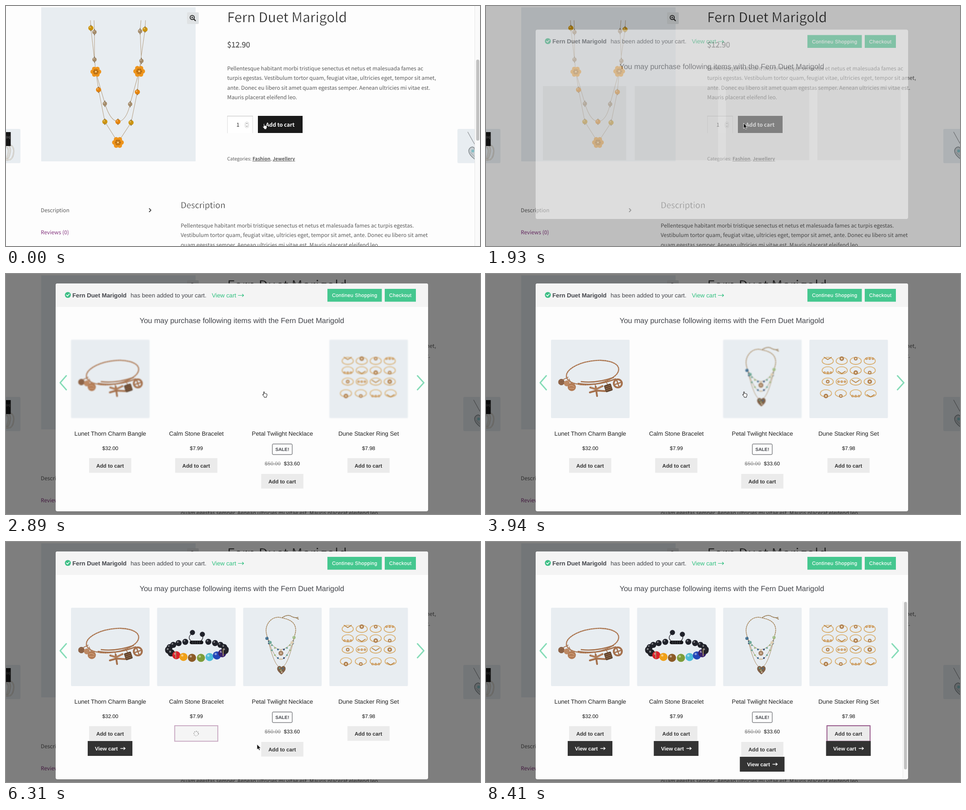
An HTML page for the animation above (9.01 s loop, 1050 px wide and 533 px high).

```html
<!DOCTYPE html>
<html lang="en">
<head>
<meta charset="utf-8">
<title>Shop popup</title>
<style>
html, body { margin: 0; height: 100%; overflow: hidden; background: #fdfdfd; }
svg { display: block; width: 100vw; height: 100vh; }
text { text-rendering: geometricPrecision; white-space: pre; }
.page { font: 11.86px "Noto Sans CJK SC", "Noto Sans CJK JP", "Noto Sans CJK", sans-serif; fill: #5a5a5a; }
.thin { fill: #2b2b2b; stroke: #fdfdfd; stroke-width: .5px; }
.pop { font: 13.2px "Liberation Sans", Arial, sans-serif; fill: #43454b; }
.mid { text-anchor: middle; }
.bold { font-weight: 700; }
.small { font-size: 11.6px; }
.line { fill: none; stroke-linecap: round; stroke-linejoin: round; }
</style>
</head>
<body>
<svg id="stage" viewBox="0 0 1050 533"></svg>
<script>
const LOOP = 9010, NAME = 'Fern Duet Marigold';
const $ = id => document.getElementById(id);
const map = (list, f) => list.map(f).join('');
const range = n => [...Array(n).keys()];
const text = (x, y, s, attrs = '') => `<text x="${x}" y="${y}" ${attrs}>${s}</text>`;
const rect = (x, y, w, h, fill, attrs = '') => `<rect x="${x}" y="${y}" width="${w}" height="${h}" fill="${fill}" ${attrs}/>`;
const dot = (x, y, r, fill, attrs = '') => `<circle cx="${x}" cy="${y}" r="${r}" fill="${fill}" ${attrs}/>`;
const line = (d, color, w = 1, attrs = '') => `<path class="line" d="${d}" stroke="${color}" stroke-width="${w}" ${attrs}/>`;
const oval = (x, y, rx, ry, color, w, attrs = '') => `<ellipse cx="${x}" cy="${y}" rx="${rx}" ry="${ry}" fill="none" stroke="${color}" stroke-width="${w}" ${attrs}/>`;
const bead = (x, y, r, color) => dot(x, y, r, color) + dot(x - r * .3, y - r * .35, r * .28, '#fff', 'opacity=".45"');
const spinner = (id, x, y, r, size) => `<g id="${id}" display="none"><g transform="translate(${x} ${y})"><g class="spin">` +
  map(range(8), i => dot(r * Math.cos(i * Math.PI / 4), r * Math.sin(i * Math.PI / 4), size, '#777', `opacity="${.4 + i * .08}"`)) + '</g></g></g>';

function flower(x, y, r) {
  const ring = (n, d, s, color) => map(range(n), i =>
    dot(x + d * Math.cos(i * 2 * Math.PI / n), y + d * Math.sin(i * 2 * Math.PI / n), s, color));
  return ring(6, r * .6, r * .4, '#ee951d') + dot(x, y, r * .55, '#d98212') + ring(6, r * .34, 1.2, '#8b5a20') + dot(x, y, 1.8, '#f4d8a0');
}

function mainNecklace() {
  const strands = 'M187 32L188 49L199 146L205 186L219 257L248 303L277 259L291 191L295 145L308 52L309 32' +
    'M195 32L196 58L196 119L199 146Q208 180 219 216Q230 254 248 257Q267 255 275 217L295 145L300 122L297 56L299 32';
  const beads = { '#cc940f': [[188, 49], [308, 52], [219, 257], [277, 259]],
    '#e5850f': [[205, 186], [291, 191], [248, 257]],
    '#a58c6b': [[196, 58], [297, 56], [196, 119], [300, 122], [219, 217], [275, 218]] };
  return line(strands, '#b8a48a', 1.1) +
    map(Object.entries(beads), ([c, list]) => map(list, ([x, y]) => bead(x, y, c == '#a58c6b' ? 4.8 : 5.7, c) + line(`M${x} ${y - 6.5}v2m0 9v2`, '#7d6a50', 1.6))) +
    flower(199, 146, 12) + flower(295, 145, 13) + flower(248, 303, 13);
}

function bangle() {
  const c = '#a5714d';
  const tilt = 'transform="rotate(-9 236 219)"';
  return oval(236, 219, 58.5, 26, c, 2.4, tilt) + oval(236, 219, 58.5, 26, '#d5a47d', 1, tilt + ' stroke-dasharray="2 3"') +
    line('M204 243Q245 250 287 233M211 239Q245 243 282 230', c, 2.6) +
    line('M182 229L170 235M184 233L190 246M242 244V250M266 240L270 246M288 234L292 240', c, 1.5) +
    dot(167, 240, 7, '#7d553b') + dot(179, 243, 6.5, '#bd8964') + dot(190, 251, 9, '#b37c56') +
    line('M160 240H174M162 236H172M162 244H172', '#d2a079', .8) + line('M184 249Q190 245 196 251M185 254H195', '#dfb38f', 1) +
    line('M243 250L246 271M231 252L244 256L258 249M230 263L244 259L264 260', c, 4) + line('M232 252L244 256L257 250', '#cc9a75', 1) +
    `<g transform="rotate(-18 271 253)">${rect(263, 245, 16, 16, '#5f442f', 'rx="2"')}${line('M265 249H277M265 253H277M265 257H277', '#a7754f', 1.2)}</g>` +
    oval(292, 243, 9, 9, c, 4) + line('M289 235L295 251M284 246L301 240', c, 2.5);
}

function stoneBracelet() {
  const back = map(range(12), i => {
    const a = Math.PI * (1.02 + i * .087);
    return i > 4 && i < 7 ? '' : bead(423 + 64 * Math.cos(a), 240 + 20 * Math.sin(a), 6.7, '#20222a');
  });
  const colors = ['#202127', '#202127', '#d8232d', '#f0a018', '#8b5a26', '#7d9d3a', '#4dbcd8', '#2447b8', '#39226f', '#24232b'];
  const front = map(colors, (c, i) => {
    const a = Math.PI * (.96 - i * .101);
    return bead(423 + 63 * Math.cos(a), 238 + 19.5 * Math.sin(a), i > 1 && i < 9 ? 9 : 8, c);
  });
  return line('M413 202Q399 213 412 221M435 206Q439 215 430 221', '#282a30', 1.4) + dot(413, 201, 5.7, '#20222a') + dot(435, 205, 5.7, '#20222a') +
    back + line('M411 223H433', '#17181c', 8) + line('M414 219V227M419 219V227M424 219V227M429 219V227', '#55565b', .8) +
    front + line('M376 244V258M481 238V253', '#a48d68', 2);
}

function tierNecklace() {
  const gold = '#a98a62', tints = ['#3f6c8e', '#6da796', '#d9c9ad', '#9fbb85', '#344d77'];
  const tier = (dip, n) => map(range(n), i => {
    const u = (i + .5) / n * 2 - 1;
    return dot(609 + 30 * u, 216 + dip * (1 - u * u), 2, tints[(i * 2 + n) % 5]);
  });
  return line('M581 216Q570 192 584 176Q596 163 613 169Q646 175 641 202L637 216', gold, 1.7, 'stroke-dasharray="2.5 2"') +
    line('M612 168Q623 160 632 165T648 167M642 168L649 172', '#9b805b', 1.8, 'stroke-dasharray="2.5 1.8"') +
    map([24, 46, 64], d => line(`M580 215Q609 ${215 + 2 * d} 638 215`, gold, 1)) +
    tier(24, 9) + tier(44, 9) + map([[578, 214], [585, 223], [634, 223], [638, 212]], ([x, y], i) => bead(x, y, 3.5, tints[i])) +
    dot(609, 247, 5.5, '#a38365') + dot(609, 247, 2, '#d8bca0') +
    `<path d="M610 294Q597 284 602 277Q607 273 610 278Q614 273 618 277Q623 284 610 294Z" fill="#806148"/>` +
    map([[606, 280, 1], [613, 281, 0], [609, 285, 3], [611, 289, 2]], ([x, y, i]) => dot(x, y, 1.7, tints[i]));
}

function ringSet() {
  const rows = [193, 214, 239, 265], gemShift = [-5, 5, 0, 6];
  return map(range(16), i => {
    const col = i % 4, row = i >> 2, x = 757 + col * (row == 3 ? 33 : 31) - (row == 3 ? 4 : 0), y = rows[row];
    const gem = (i * 7 + row) % 4, g = y + gemShift[row];
    const top = gem == 0 ? line(`M${x - 8} ${g - 3}L${x} ${g + 2}L${x + 8} ${g - 3}`, '#b7813f', 1.8)
      : gem == 1 ? map([-7, 0, 7], d => dot(x + d, g, 2.6, '#c18a4b') + dot(x + d, g, 1, '#f6e6cb'))
      : dot(x, g, gem + 2, '#af8050') + dot(x, g, 2, '#efdbc0');
    return oval(x, y, 12.5, 8, '#cfa160', 1.7) + oval(x, y - .7, 12.5, 7.5, '#efd29c', .7) + top;
  });
}

const items = [
  { x: 144, y: 409, name: 'Lunet Thorn Charm Bangle', price: '$32.00', load: 4840, done: 5720, art: bangle },
  { x: 334.7, y: 409, name: 'Calm Stone Bracelet', price: '$7.99', load: 5570, done: 6610, art: stoneBracelet },
  { x: 525.3, y: 444, name: 'Petal Twilight Necklace', price: '$33.60', load: 6610, done: 7660, art: tierNecklace },
  { x: 716.3, y: 409, name: 'Dune Stacker Ring Set', price: '$7.98', load: 7510, done: 8110, art: ringSet }
];

const lorem = ['Pellentesque habitant morbi tristique senectus et netus et malesuada fames ac',
  'turpis egestas. Vestibulum tortor quam, feugiat vitae, ultricies eget, tempor sit amet,',
  'ante. Donec eu libero sit amet quam egestas semper. Aenean ultricies mi vitae est.',
  'Mauris placerat eleifend leo.'];
const wide = [lorem[0] + ' turpis egestas.',
  'Vestibulum tortor quam, feugiat vitae, ultricies eget, tempor sit amet, ante. Donec eu libero sit amet',
  'quam egestas semper. Aenean ultricies mi vitae est. Mauris placerat eleifend leo.'];

const page = `<g class="page">
  ${rect(0, 0, 1050, 533, '#fdfdfd')}${rect(78, 3, 342, 342, '#e8edf1')}${mainNecklace()}
  ${rect(401, 14, 26, 26, '#dfe2e4', 'rx="2"')}
  ${oval(412.5, 25.5, 4.6, 4.6, '#222', 1.8)}${line('M416 29L419.5 32.5', '#222', 2.4)}${line('M410.5 25.5H414.5M412.5 23.5V27.5', '#222', 1.2)}
  ${rect(-4, 273, 36, 76, '#e8edf1', 'rx="3"')}${line('M-2 306Q12 309 9 326T-2 342M-2 308Q19 306 17 325T2 342M-2 312Q8 314 4 330T-2 338', '#a9a59c', 2.4)}
  ${line('M-2 306Q12 309 9 326T-2 342M-2 308Q19 306 17 325T2 342M-2 312Q8 314 4 330T-2 338', '#f2f0ea', 1.2)}
  ${rect(0, 280, 10.5, 31, '#161616')}${line('M2 294V289M5 293V290M8 295V289', '#999', .8)}
  <g id="thumb">${rect(1000, 273, 60, 76, '#e8edf1', 'rx="3"')}${line('M1023 280L1034 300L1040 310', '#8c8f92', 1.2)}
    <path d="M1038 340Q1020 326 1027 316Q1034 309 1039 318Q1045 309 1052 318Q1052 331 1038 340Z" fill="#c6cdd1" stroke="#7f868a" stroke-width="1.4"/>
    ${dot(1034, 322, 3.2, '#83bdc4')}${line('M1029 325Q1034 331 1040 336M1037 318L1042 326', '#8f979b', 1)}</g>
  ${text(490, 36, NAME, 'class="thin" font-size="30" font-weight="300"')}
  ${text(490, 92, '$12.90', 'font-size="16.6" stroke="#5a5a5a" stroke-width=".4"')}
  ${map(lorem, (s, i) => text(490, 142.5 + i * 21.5, s))}
  ${rect(490.5, 244.5, 56, 37.5, '#fff')}${line('M490.5 282V244.5H546.5V282', '#dcdcdc')}${line('M490.5 244.5H546.5', '#bbb')}
  ${text(510.5, 268, '1', 'fill="#222"')}${rect(529.5, 257.5, 8, 13, '#fff', 'rx="4" stroke="#ccc"')}
  ${line('M531.8 262L533.5 260L535.2 262M531.8 266L533.5 268L535.2 266', '#666')}
  <g id="add">${rect(558, 244, 99, 38, '#1a1a1a')}${text(607.3, 268, 'Add to cart', 'class="mid" font-weight="600" fill="#fff"')}</g>
  <g id="addWait" display="none">${rect(558, 244, 99, 38, '#f5f5f5')}${text(607.3, 268, 'Add to cart', 'class="mid" font-weight="600" fill="#fff"')}</g>
  ${spinner('pageSpin', 608, 263.5, 7, 1.7)}
  <text x="490" y="343" font-size="10.3">Categories: <tspan font-weight="600" text-decoration="underline">Fashion</tspan>, <tspan font-weight="600" text-decoration="underline">Jewellery</tspan></text>
  ${text(77, 458, 'Description')}${line('M317.5 450L321 453.5L317.5 457', '#444', 1.8)}
  ${text(77, 507, 'Reviews (0)', 'fill="#85357f"')}
  ${text(387, 449, 'Description', 'class="thin" font-size="18.5" font-weight="300"')}
  ${map(wide, (s, i) => text(387, 491.5 + i * 21.5, s))}
  <g id="pageBar">${rect(1038, 0, 12, 533, '#fafafa')}${line('M1038.5 0V533', '#e6e6e6')}${rect(1041.5, 119, 7, 180, '#c1c1c1', 'rx="3.5"')}</g>
</g>`;

function product(p, i) {
  const mid = p.x + 87, b = p.y;
  const sale = i != 2 ? text(mid, 391, p.price, 'class="mid small" fill="#111"') :
    rect(590, 377.5, 44, 23.5, 'none', 'rx="2" stroke="#43454b"') + text(612, 393, 'SALE!', 'class="mid bold" font-size="10.2"') +
    text(573, 425, '$50.00', 'class="small" fill="#8a8a8a" text-decoration="line-through"') + text(615.5, 425, p.price, 'class="small" fill="#111"');
  return `<g id="art${i}">${rect(p.x, 146, 174, 174, '#e8edf1', 'rx="2"')}${p.art()}</g>
    ${text(mid, 359, p.name, 'class="mid" fill="#222"')}${sale}
    ${rect(mid - 47, b, 93.5, 32.5, '#ebebeb', `id="btn${i}"`)}
    ${text(mid - .5, b + 21, 'Add to cart', `id="lab${i}" class="mid bold small" fill="#333"`)}
    ${rect(mid - 48, b - 1, 95.5, 34.5, 'none', `id="ring${i}" stroke="#96588a" stroke-width="2"`)}
    ${spinner('spin' + i, mid - .5, b + 16.5, 5, 1.1)}
    <g id="view${i}">${rect(mid - 50, b + 33, 99, 33, '#333')}
      ${text(mid - 34, b + 53.5, 'View cart', 'class="bold small" fill="#fff"')}
      ${line(`M${mid + 23} ${b + 49.5}h10m-3 -2.5l3 2.5l-3 2.5`, '#fff', 1.6)}</g>`;
}

const greenButton = (x, w, s) => rect(x, 33, w, 28.5, '#45c78f') + text(x + w / 2 + .2, 51, s, 'class="mid" font-size="11" letter-spacing=".4" fill="#fff" stroke="#fff" stroke-width=".2"');
const popup = `<rect id="dim" width="1050" height="533" fill="#000"/>
<g id="popup" class="pop">
  ${rect(110, 21, 825, 506, '#fdfdfd', 'id="panel" rx="4"')}
  <g id="shift">
    <path id="head" d="M110 73V25Q110 21 114 21H931Q935 21 935 25V73Z" fill="#f4f4f4"/>
    ${dot(137, 46.5, 6.6, '#3fbf87')}${line('M134 46.7L136.2 49L140.2 44.5', '#fff', 1.7)}
    ${text(147, 51.5, NAME, 'class="bold"')}${text(276, 51.5, 'has been added to your cart.')}
    ${text(456, 51.5, 'View cart', 'fill="#2fc07f"')}${line('M514.5 47.5H526.5M523.5 44.8L526.5 47.5L523.5 50.2', '#2fc07f', 1.2)}
    ${greenButton(712, 120.5, 'Contineu Shopping')}${greenButton(839, 69, 'Checkout')}
    ${text(522.5, 108.5, 'You may purchase following items with the ' + NAME, 'class="mid" font-size="16.4"')}
    <g id="bones">${map([126, 329.5, 531.5, 734], x => rect(x, 146.5, 184.5, 164.5, '#ececec'))}</g>
  </g>
  <g id="goods">${map(items, product)}
    ${line('M133.5 226L120 241.5L133.5 257', '#86dcb8', 3)}${line('M911.5 226L925.5 241.5L911.5 257', '#86dcb8', 3, 'id="next"')}
    <g id="popBar">${rect(923, 132, 12, 392, '#fafafa')}${line('M923.5 132V527', '#e8e8e8')}${rect(926, 133, 6.5, 372, '#c1c1c1', 'rx="3.2"')}</g>
  </g>
</g>`;

const cursors = `<g id="cursor">
  <path id="hand" transform="translate(-5.5 -6.5)" d="M3 1.4Q4 .2 5 1.4V5Q6 4.2 6.9 5.2Q7.9 4.6 8.7 5.6Q10.3 5 10.6 6.5V9.4L9.5 11.7V13.4H4.4V12L1 8.1Q.5 6.8 1.7 6.7L3 7.8Z" fill="#fff" stroke="#111"/>
  <path id="arrow" transform="translate(-2.5 -7)" d="M0 0V12L2.8 9.6L4.7 13.7L6.8 12.7L5 8.8H8.6Z" fill="#111" stroke="#fff" stroke-width=".9"/>
</g>`;
$('stage').innerHTML = page + popup + cursors;

// Screen refreshes come in steps of 150 ms, restarted at these times.
const starts = [0, 1190, 1780, 2110, 2590, 4390, 5420, 6610];
const path = [[4240, 573, 267], [4690, 236, 430], [5000, 236, 430], [5420, 417, 431], [5870, 417, 431],
  [6320, 608, 465], [6910, 608, 465], [7360, 798, 426], [7660, 798, 426], [8410, 996, 546]];

function cursorAt(q) {
  const i = path.findIndex(p => p[0] > q);
  if (i < 1) return (i ? path[path.length - 1] : path[0]).slice(1);
  const [t0, x0, y0] = path[i - 1], [t1, x1, y1] = path[i];
  const u = (q - t0) / (t1 - t0), e = u * u * (3 - 2 * u);
  return [x0 + (x1 - x0) * e, y0 + (y1 - y0) * e];
}

const show = (id, on) => $(id).setAttribute('display', on ? 'inline' : 'none');
const set = (id, key, value) => $(id).setAttribute(key, value);
const spins = document.querySelectorAll('.spin');

function draw(t) {
  const start = starts.filter(s => s <= t).pop();
  const q = start + Math.floor((t - start) / 150) * 150;
  const fade = Math.max(0, Math.min(1, (q - 1780) / 300));
  const open = fade > 0, ready = t >= 2590;
  const [cx, cy] = cursorAt(q);
  const inside = (x, y, w, h) => cx > x && cx < x + w && cy > y && cy < y + h;

  const wait = t >= 1190 && !open;
  show('add', !wait); show('addWait', wait); show('pageSpin', wait);
  show('pageBar', !open);
  set('thumb', 'transform', `translate(${open ? 13 : 0})`);
  set('dim', 'opacity', fade / 2);
  set('popup', 'opacity', fade);
  show('popup', open);
  set('panel', 'y', ready ? 21 : 52.5);
  set('panel', 'height', ready ? 506 : t < 2290 ? 420.5 : 431.5);
  set('shift', 'transform', `translate(0 ${ready ? 0 : 31.5})`);
  show('head', ready); show('bones', !ready); show('goods', ready);

  const sharp = [3490, 4090, 4090, 3940], shown = [2740, 4090, 3940, 2890];
  let link = false;
  items.forEach((p, i) => {
    const loading = t >= p.load && t < p.done, next = items[i + 1];
    const over = inside(p.x + 40, p.y, 93.5, 32.5) && !loading;
    link = link || over || inside(p.x, 146, 174, 174);
    show('art' + i, t >= shown[i]);
    $('art' + i).style.filter = t < sharp[i] ? 'blur(.9px)' : 'none';
    set('btn' + i, 'fill', loading ? '#f5f5f5' : over ? '#d2d2d2' : '#ebebeb');
    show('lab' + i, !loading);
    show('ring' + i, t >= p.load && !(next && t >= next.load && !loading));
    set('ring' + i, 'opacity', loading ? .5 : 1);
    show('spin' + i, loading);
    show('view' + i, t >= p.done);
  });
  spins.forEach(s => s.setAttribute('transform', `rotate(${q * .3})`));

  const bar = t >= 7660;
  show('popBar', bar);
  set('next', 'transform', `translate(${bar ? -12 : 0})`);
  const hand = t < 900 || t >= 2890 && link;
  show('hand', hand); show('arrow', !hand);
  set('cursor', 'transform', `translate(${cx} ${cy})`);
}

const begin = performance.now();
(function frame() {
  draw((performance.now() - begin) % LOOP);
  requestAnimationFrame(frame);
})();
</script>
</body>
</html>
```
